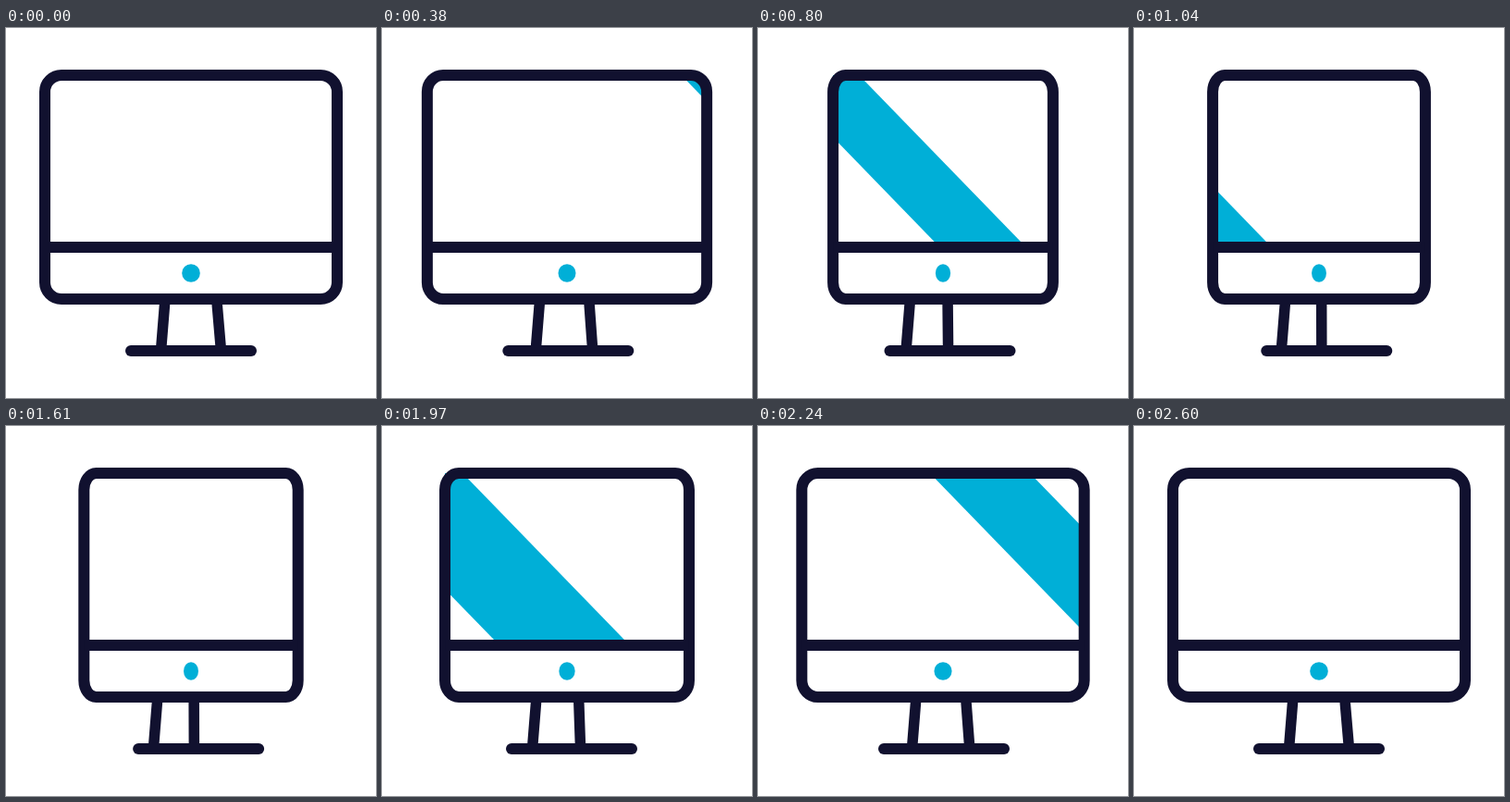
An HTML page that plays this animation: 400 by 400 pixels, repeating every 2.63 s.

```html
<!DOCTYPE html>
<html lang="en">
<head>
<meta charset="utf-8">
<title>Turning monitor</title>
<style>
  html, body { margin: 0; width: 100%; height: 100%; overflow: hidden; background: #fff; }
  svg { display: block; width: 100%; height: 100%; }
  .ink { fill: none; stroke: #11112f; stroke-width: 12; }
  .accent { fill: #00afd7; }
</style>
</head>
<body>
<svg viewBox="0 0 400 400">
  <clipPath id="glass"><rect id="pane" y="51" height="186"/></clipPath>
  <g clip-path="url(#glass)"><polygon id="glare" class="accent"/></g>
  <g class="ink">
    <path id="legs" stroke-width="11.5"/>
    <path id="base" stroke-linecap="round"/>
    <rect id="frame" y="51" height="242" ry="18"/>
    <path id="divider"/>
  </g>
  <ellipse id="button" class="accent" cx="200" cy="265" ry="9.8"/>
</svg>
<script>
const LOOP = 2630, STEP = 30;
const TURN = 44.3;     // how far each side moves in
const SLOPE = 1.03;    // steepness of the glare edges

const set = (id, attrs) => {
  const el = document.getElementById(id);
  for (const name in attrs) el.setAttribute(name, attrs[name]);
};
const progress = (t, from, to) => Math.min(1, Math.max(0, (t - from) / (to - from)));
const smooth = p => p * p * (3 - 2 * p);
const tween = (t, from, to, a, b) => a + (b - a) * smooth(progress(t, from, to));

// cubic-bezier(x1, 0, x2, 1)
function bezier(p, x1, x2) {
  let lo = 0, hi = 1;
  for (let i = 0; i < 24; i++) {
    const s = (lo + hi) / 2, r = 1 - s;
    const x = 3 * x1 * s * r * r + 3 * x2 * s * s * r + s ** 3;
    if (x < p) lo = s; else hi = s;
  }
  return smooth((lo + hi) / 2);
}

const turnAt = t => t < 1325
  ? bezier(progress(t, 200, 1325), 0.333, 0.03)
  : 1 - bezier(progress(t, 1325, 2600), 0.7, 0.4);

// x of the lower and upper glare edges along the top of the screen
const glareAt = t => t < 1450
  ? [tween(t, 150, 1155, 400, -130), tween(t, 140, 1397, 400, -130)]
  : [tween(t, 1762, 2598, -130, 400), tween(t, 1560, 2510, -110, 400)];

function draw(t) {
  const k = turnAt(t);
  const half = 158 - TURN * k, left = 200 - half, right = 200 + half;
  const side = { x: left, width: 2 * half };
  set('pane', side);
  set('frame', { ...side, rx: 18 * half / 158 });
  set('divider', { d: `M${left} 237H${right}` });
  set('button', { rx: 9.8 - 1.9 * k });

  const shift = 8.5 * k;
  set('legs', {
    d: `M${172 - shift} 293L${167.5 - shift} 349M${227.7 - 25.7 * k} 293L${232.5 - 30.5 * k} 349`
  });
  set('base', { d: `M${135 + shift} 349h130` });

  const [lower, upper] = glareAt(t);
  const edge = (u, y) => `${u + (y - 57) / SLOPE},${y}`;
  set('glare', {
    points: [edge(lower, 45), edge(upper, 45), edge(upper, 245), edge(lower, 245)].join(' ')
  });
}

function tick() {
  const t = performance.now() % LOOP;
  draw(Math.max(0, Math.floor((t - 20) / STEP) * STEP + 20));
  requestAnimationFrame(tick);
}
tick();
</script>
</body>
</html>
```
